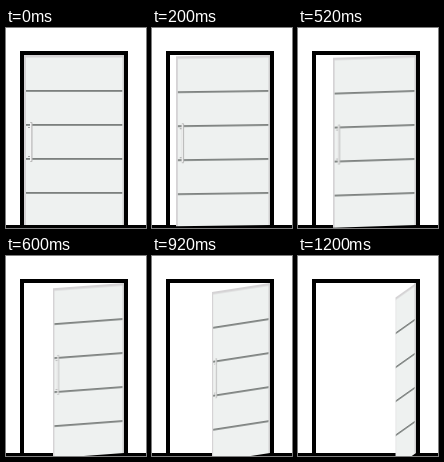
Animation of 140 by 200 pixels, one loop 1.4 s. Source, as an HTML page:

```html
<!DOCTYPE html>
<html lang="en">
<head>
<meta charset="utf-8">
<title>Opening door</title>
<style>
  html, body { margin: 0; width: 100%; height: 100%; overflow: hidden; background: #fff; }
  svg { display: block; width: 140px; height: 200px; }
</style>
</head>
<body>
<svg viewBox="0 0 140 200">
  <path d="M14 200V23H122V200H118V27H18V200Z"/>
  <rect y="197" width="140" height="3"/>
  <g id="door">
    <rect x="18" y="27" width="100" height="170" fill="#eef1f0"/>
    <path d="M18 27H118V29.500H20V197H18Z" fill="#d5d3d5"/>
    <g id="stripes" fill="#7c807e"></g>
    <g id="handle">
      <path d="M22 99.500H26M22 128.500H26" stroke="#a0a0a0"/>
      <rect x="24" y="94" width="2.500" height="40" rx="1" fill="#b8b8b8"/>
      <rect x="24" y="95" width="1.300" height="38" fill="#f4f4f4"/>
    </g>
  </g>
  <rect x="116.500" y="27" width="1.500" height="170" fill="#cfcfcf"/>
</svg>
<script>
  const HINGE = 118, WIDTH = 100, LOOP = 1400;
  // left edge x, drop of the left edge, handle opacity
  const poses = [
    [18, 0, 1], [24, 1.3, 1], [35, 2.7, 1], [47, 5.3, 1],
    [60, 9, 1], [76.5, 15, 1], [97.5, 14.5, 0]
  ];
  const $ = id => document.getElementById(id);

  for (const y of [62, 96, 130, 164]) {
    const bar = document.createElementNS("http://www.w3.org/2000/svg", "rect");
    const box = { x: 20, y, width: 96.5, height: 1.8 };
    for (const key in box) bar.setAttribute(key, box[key]);
    $("stripes").append(bar);
  }

  // Turn about the right edge: shrink in x, shear in y.
  function swing([left, drop]) {
    const sx = (HINGE - left) / WIDTH, shear = -drop / WIDTH;
    return `matrix(${sx}, ${shear}, 0, 1, ${HINGE * (1 - sx)}, ${-HINGE * shear})`;
  }

  function play(id, style) {
    const frames = poses.map((pose, i) => ({
      offset: i / poses.length, easing: "step-end", ...style(pose)
    }));
    frames.push({ ...frames.at(-1), offset: 1 });
    $(id).animate(frames, { duration: LOOP, iterations: Infinity });
  }

  play("door", pose => ({ transform: swing(pose) }));
  play("handle", pose => ({ opacity: pose[2] }));
</script>
</body>
</html>
```
